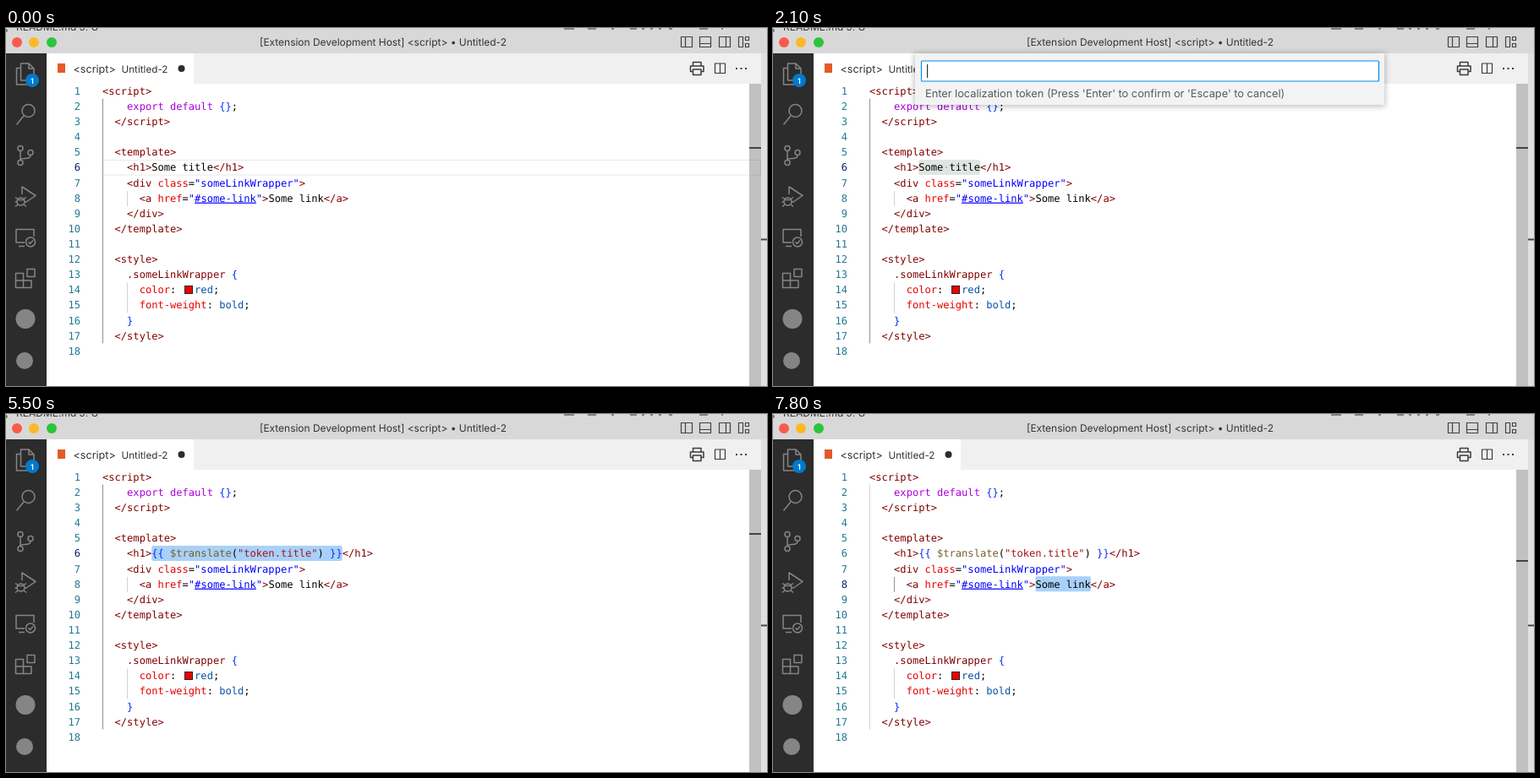
Animation, 900 px wide and 424 px high, one loop 8000 ms. Source, as an HTML page:

```html
<!DOCTYPE html>
<html lang="en">
<head>
<meta charset="utf-8">
<title>Editor</title>
<style>
  html, body { margin: 0; width: 100%; height: 100%; overflow: hidden; background: #d8d8d8; }
  svg { display: block; }
  text { white-space: pre; font-family: Inter, sans-serif; text-rendering: geometricPrecision; fill: #333; }
  .code text { font: 12.084px "DejaVu Sans Mono", monospace; fill: #000; }
  .code .num { fill: #237893; text-anchor: end; }
  .code .num.on { fill: #0b216f; }
  .t { fill: #800000; } .a { fill: #e50000; } .s { fill: #0000ff; } .p { fill: #af00db; }
  .b { fill: #0431fa; } .v { fill: #0451a5; } .f { fill: #795e26; } .q { fill: #a31515; }
  .u { fill: #0000ff; text-decoration: underline; }
  .icon { fill: none; stroke-width: 1.5; stroke-linejoin: round; }
  .guide { stroke: #d3d3d3; }
  .guide.on { stroke: #939393; }
</style>
</head>
<body>
<svg width="900" height="424" viewBox="0 0 900 424">
  <defs>
    <filter id="soft" x="-5%" y="-30%" width="110%" height="160%"><feGaussianBlur stdDeviation="3.5"/></filter>
  </defs>

  <!-- window behind -->
  <rect width="900" height="424" fill="#d8d8d8"/>
  <rect x="893" y="30" width="7" height="394" fill="#e0e0e0"/>
  <path d="M893 250.5h7" stroke="#444" stroke-width="2"/>
  <text x="12" y="3" font-size="12">README.md 9, U</text>
  <path d="M660 1h12M688 1h10M716 1h3M738 1h8M752 1h3M762 1h3M772 1h3M784 1h4M820 1h10M846 1h2" stroke="#666" stroke-width="1.5"/>
  <circle cx="0" cy="3" r="2" fill="#3a9d3a"/>

  <!-- title bar -->
  <path d="M0 30V11Q0 3 8 3H885Q893 3 893 11V30Z" fill="#d8d8d8"/>
  <circle cx="13" cy="17" r="6" fill="#fb5a4b"/>
  <circle cx="33" cy="17" r="6" fill="#fdb924"/>
  <circle cx="54" cy="17" r="6" fill="#2bc43c"/>
  <text x="446" y="21" font-size="11.95" text-anchor="middle">[Extension Development Host] &lt;script&gt; • Untitled-2</text>
  <path class="icon" stroke="#424242" style="stroke-width:1.2" d="M798.5 10.5h13v12h-13zM803.5 10.5v12M820.5 10.5h13v12h-13zM820.5 18.5h13M843.5 10.5h13v12h-13zM851.5 10.5v12M866.5 10.5h5v12h-5zM874.5 10.5h4v4h-4zM874.5 18.5h4v4h-4z"/>

  <!-- tabs and page -->
  <rect y="30" width="48" height="394" fill="#2c2c2c"/>
  <rect x="48" y="30" width="845" height="394" fill="#fff"/>
  <rect x="222" y="30" width="671" height="36" fill="#f0f0f0"/>
  <rect x="61" y="42" width="9" height="11" fill="#e35a2a"/>
  <text x="79.5" y="52.5" font-size="12.6">&lt;script&gt;</text>
  <text x="136.5" y="52.5" font-size="11.7">Untitled-2</text>
  <circle cx="207.5" cy="48" r="4" fill="#2d2d2d"/>
  <g class="icon" stroke="#3b3b3b">
    <path d="M812.5 45v-4.5h9.5V45M812.5 51.5h-3V45h15.5v6.5h-3M812.5 49h9.5v6.5h-9.5z"/>
    <path d="M838.5 42h12v11.5h-12zM844.5 42v11.5" style="stroke-width:1.2"/>
    <path d="M863 48h2M868.5 48h2M874 48h2" stroke-width="2"/>
  </g>

  <!-- activity bar -->
  <g class="icon" stroke="#858585">
    <path d="M17 47.5h-4.5V67H26v-3M17.5 42h9.5l6 6v14H17.5zM27 42v6h6"/>
    <circle cx="26.5" cy="98" r="7.5"/><path d="M21 104l-8.5 10.5"/>
    <circle cx="17" cy="142.5" r="3"/><circle cx="17" cy="159.5" r="3"/><circle cx="29" cy="147.5" r="3"/>
    <path d="M17 145.5v11M29 150.5q0 4-6 4-6 0-6 2"/>
    <path d="M19 197v-9l16 10.5-11 7.5"/>
    <circle cx="17.5" cy="205.5" r="4.5"/>
    <path d="M13.5 203.5h8M11 200.5l3 2M24 200.5l-3 2M10.5 206h2.5M22 206h2.5M11 211.5l3-2.5M24 211.5l-3-2.5"/>
    <path d="M22 254H12v-15.5h21V247M15 258.5h7"/>
    <circle cx="29" cy="253.5" r="5.5"/><path d="M26.5 253.5l2 2 3.5-4"/>
    <path d="M11.5 290.5h9v8.5h9.5v8.5H11.5zM11.5 299h9v8.5M25 285.5h9v9h-9z"/>
  </g>
  <circle cx="31" cy="62" r="8" fill="#007acc"/>
  <text x="31" y="65.5" font-size="9" font-weight="600" text-anchor="middle" style="fill:#fff">1</text>
  <circle cx="23" cy="344.5" r="11.5" fill="#858585"/>
  <circle cx="22" cy="394" r="10" fill="#858585"/>

  <!-- editor -->
  <rect id="row" x="114.5" width="778" height="17.5" fill="none" stroke="#e8e8e8"/>
  <g id="marks"></g>
  <path class="guide" d="M143.5 193v18M143.5 301.5v36"/>
  <path class="guide" id="outer" d="M114.5 83.5v290"/>
  <path class="guide on" id="inner" d="M143.5 193v18"/>
  <g class="code" id="code"></g>
  <rect x="211.5" y="305.5" width="9" height="9" fill="#f00000" stroke="#222"/>
  <rect id="caret" width="2" height="18"/>
  <rect x="879" y="66" width="14" height="358" fill="#646464" opacity=".4"/>
  <rect id="ruler" x="879" width="14" height="2" fill="#444"/>

  <!-- prompt -->
  <g id="prompt" display="none">
    <rect x="167" y="30" width="557" height="63" opacity=".25" filter="url(#soft)"/>
    <rect x="168" y="30" width="555" height="61" fill="#f3f3f3"/>
    <rect x="175.5" y="39" width="541" height="24" rx="1" fill="#fff" stroke="#0090f1" stroke-width="1.2"/>
    <text id="typed" x="182" y="55.5" font-size="12.8" style="fill:#616161"></text>
    <rect id="bar" y="43" width="1.2" height="16" fill="#333"/>
    <text x="180" y="81.5" font-size="12.77" style="fill:#5a5a5a">Enter localization token (Press 'Enter' to confirm or 'Escape' to cancel)</text>
  </g>
</svg>
<script>
const LOOP = 8000, CELL = 7.275, LINE = 18.12;
const $ = id => document.getElementById(id);
const x = col => 114 + CELL * col;
const y = line => 65.5 + LINE * (line - 1);
const esc = s => s.replace(/&/g, '&amp;').replace(/</g, '&lt;');

// "~" starts a token; the letter after it is its class
const lines = [
  '~t<script>',
  '~k    ~pexport default ~b{}~k;',
  '~t  <\/script>',
  '',
  '~t  <template>',
  '~t    <h1>~kSome title~t<\/h1>',
  '~t    <div ~aclass~k=~s"someLinkWrapper"~t>',
  '~t      <a ~ahref~k=~s"~u#some-link~s"~t>~kSome link~t<\/a>',
  '~t    <\/div>',
  '~t  <\/template>',
  '',
  '~t  <style>',
  '~t    .someLinkWrapper ~b{',
  '~a      color~k:   ~vred~k;',
  '~a      font-weight~k: ~vbold~k;',
  '~b    }',
  '~t  <\/style>',
  ''
];
const translated = '~t    <h1>~b{{ ~f$translate~k(~q"token.title"~k) ~b}}~t<\/h1>';

const tokens = line => line.split('~').slice(1);
const paint = line => tokens(line).map(s => `<tspan class="${s[0]}">${esc(s.slice(1))}</tspan>`).join('');
const plain = line => tokens(line).map(s => s.slice(1)).join('');

$('code').innerHTML = lines.map((line, i) => {
  const base = y(i + 1) + 13.3;
  return `<text class="num" id="n${i + 1}" x="88" y="${base}">${i + 1}</text>` +
    `<text id="l${i + 1}" x="114" y="${base}">${paint(line)}</text>`;
}).join('');

// start, line, caret column (-1: hidden), selection from, to, highlighted word
const steps = [
  [0, 6, -1], [400, 6, 8],
  [900, 6, 12, 8, 12, 'some'], [1200, 6, 18, 8, 18], [1700, 6, -1, 8, 18],
  [5000, 6, 39, 8, 39], [5400, 6, -1, 8, 39],
  [5900, 8, 36], [6300, 8, -1], [6700, 8, 36],
  [7100, 8, 32, 32, 36, 'link'], [7300, 8, 27, 27, 36], [7800, 8, -1, 27, 36]
];
const OPEN = 2100, DONE = 5000;
const word = 'token.title';
const keyTimes = [3000, 3100, 3300, 3400, 3500, 3600, 3900, 4050, 4200, 4350, 4500];

const show = (id, on) => $(id).setAttribute('visibility', on ? 'visible' : 'hidden');
const block = (line, from, to, fill) =>
  `<rect x="${x(from)}" y="${y(line)}" width="${CELL * (to - from)}" height="18" rx="2" fill="${fill}"/>`;

const matches = text => lines.map((line, i) =>
  [...plain(line).matchAll(new RegExp(text, 'gi'))]
    .map(m => block(i + 1, m.index, m.index + text.length, '#d6e6f5')).join('')
).join('');

let shown = '';
function draw(t) {
  const typed = word.slice(0, keyTimes.filter(k => k <= t).length);
  const [start, line, col, from, to, text] = steps.filter(s => s[0] <= t).pop();
  const prompt = t >= OPEN && t < DONE;
  const bar = t < 2600 || t >= 3000;
  const key = [start, prompt, typed, bar].join();
  if (key === shown) return;
  shown = key;

  const selected = to !== undefined;
  $('row').setAttribute('y', Math.round(y(line)) + .5);
  show('row', !selected);
  $('marks').innerHTML = !selected ? '' :
    (text ? matches(text) : '') +
    block(line, from, to, prompt ? '#dfe6e2' : '#a8d1fa') +
    (prompt ? `<circle cx="${x(12.5)}" cy="${y(6) + 9}" r="1" fill="#a0a8a8"/>` : '');

  $('l6').innerHTML = paint(t < DONE ? lines[5] : translated);
  for (const n of [6, 8]) $('n' + n).classList.toggle('on', n === line);
  $('outer').classList.toggle('on', line === 6);
  show('inner', line === 8);
  $('ruler').setAttribute('y', line === 6 ? 141 : 173);

  show('caret', col >= 0 && !prompt);
  $('caret').setAttribute('x', x(Math.max(col, 0)) - 1);
  $('caret').setAttribute('y', y(line));

  $('prompt').setAttribute('display', prompt ? 'inline' : 'none');
  if (prompt) {
    $('typed').textContent = typed;
    $('bar').setAttribute('x', 182 + (typed ? $('typed').getComputedTextLength() : 0));
    $('bar').setAttribute('opacity', bar ? 1 : 0);
  }
}

function frame() {
  draw(performance.now() % LOOP);
  requestAnimationFrame(frame);
}
frame();
</script>
</body>
</html>
```
